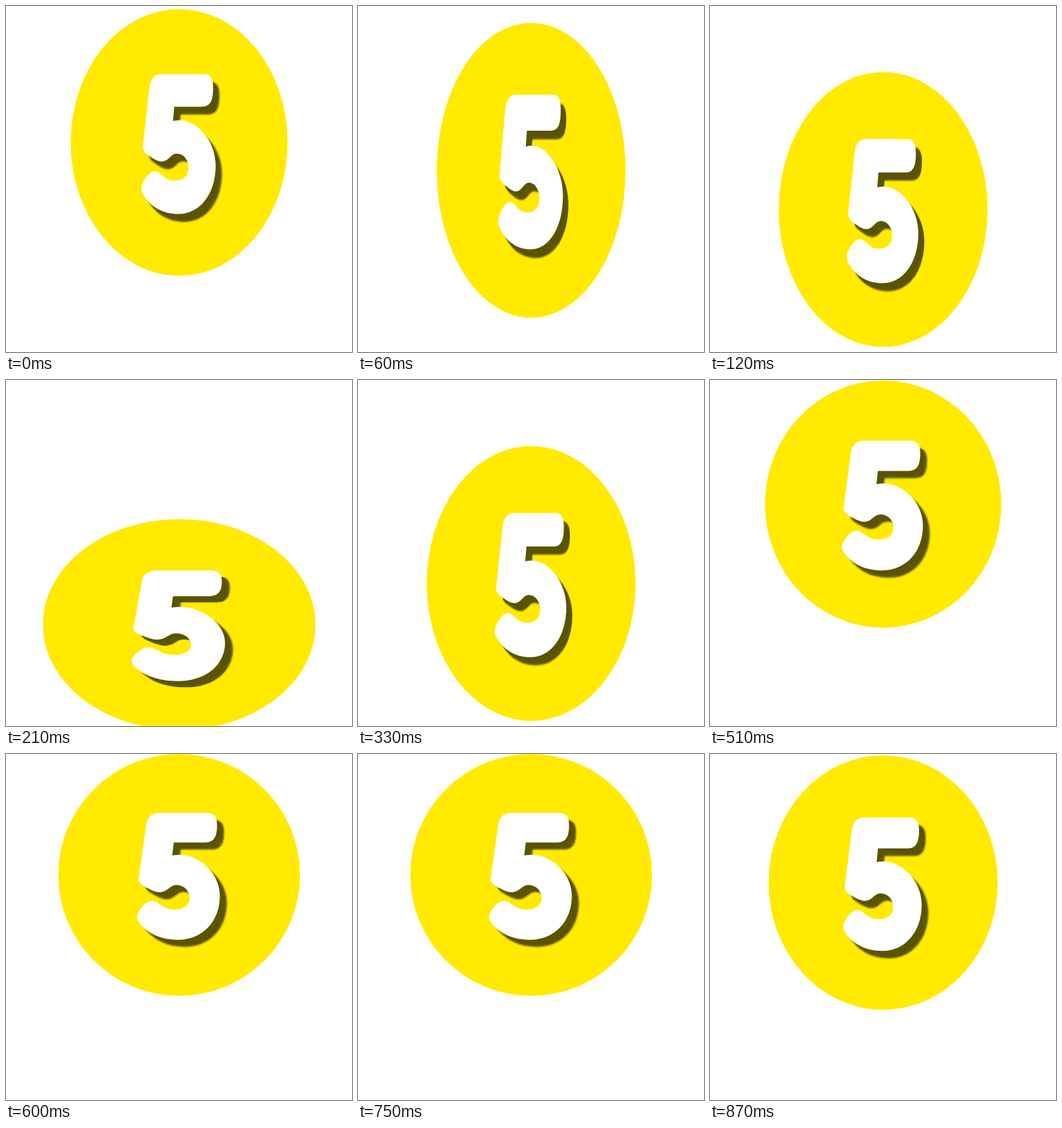
An HTML page for the animation above (0.9 s loop, 480x480 px).

```html
<!DOCTYPE html>
<html lang="en">
<head>
<meta charset="utf-8">
<title>Bouncing five</title>
<style>
  html, body { margin: 0; height: 100%; overflow: hidden; background: #fff; }
  svg { display: block; width: 480px; height: 480px; }
</style>
</head>
<body>
<svg viewBox="0 0 480 480">
  <defs>
    <filter id="soft"><feGaussianBlur stdDeviation="0.9"/></filter>
    <path id="five" d="M213 82 H279 Q292 82 292.5 97 Q293 107 290.5 114 Q287 123 276 123
      H232.5 L230.5 141 Q236 140 241 140 C267 140 296.5 165 296.5 197 C296.5 233 272 258 239 258
      C214 258 197 249 186 236 C179 228 181 222 187 214 C194 206 201 202 207 205
      C216 209 218 216 234 216 C248 216 254.5 209 254.5 200 C254.5 190 247 182 236 182
      C227 182 224 192 213 192 C206 192 197 187 189 182 Q183 178 184 172
      L194 100 Q196 82 213 82 Z"/>
  </defs>
  <g id="ball">
    <circle cx="240" cy="168" r="167.7" fill="#ffea00"/>
    <use href="#five" x="9.7" y="9.8" fill="#5a5200" filter="url(#soft)"/>
    <use href="#five" fill="#fff"/>
  </g>
</svg>
<script>
const LOOP = 900, STEP = 30, RADIUS = 167.7;
const ball = document.getElementById('ball');

function draw(now) {
  const t = Math.floor((now % LOOP) / STEP) * STEP;
  // 0 at the top of the bounce, 1 at the bottom
  const fall = ((1 + Math.sin(2 * Math.PI * t / LOOP)) / 2) ** 3;
  // Stretches in flight, squashes on landing
  const stretch = 38 * Math.sin(1.2 * Math.PI * fall) / RADIUS;
  const y = RADIUS + 173 * fall;
  ball.setAttribute('transform',
    `translate(240.2 ${y}) scale(${1 - stretch} ${1 + stretch}) translate(-240 -168)`);
}

const start = performance.now();
function tick() {
  draw(performance.now() - start);
  requestAnimationFrame(tick);
}
tick();
</script>
</body>
</html>
```
